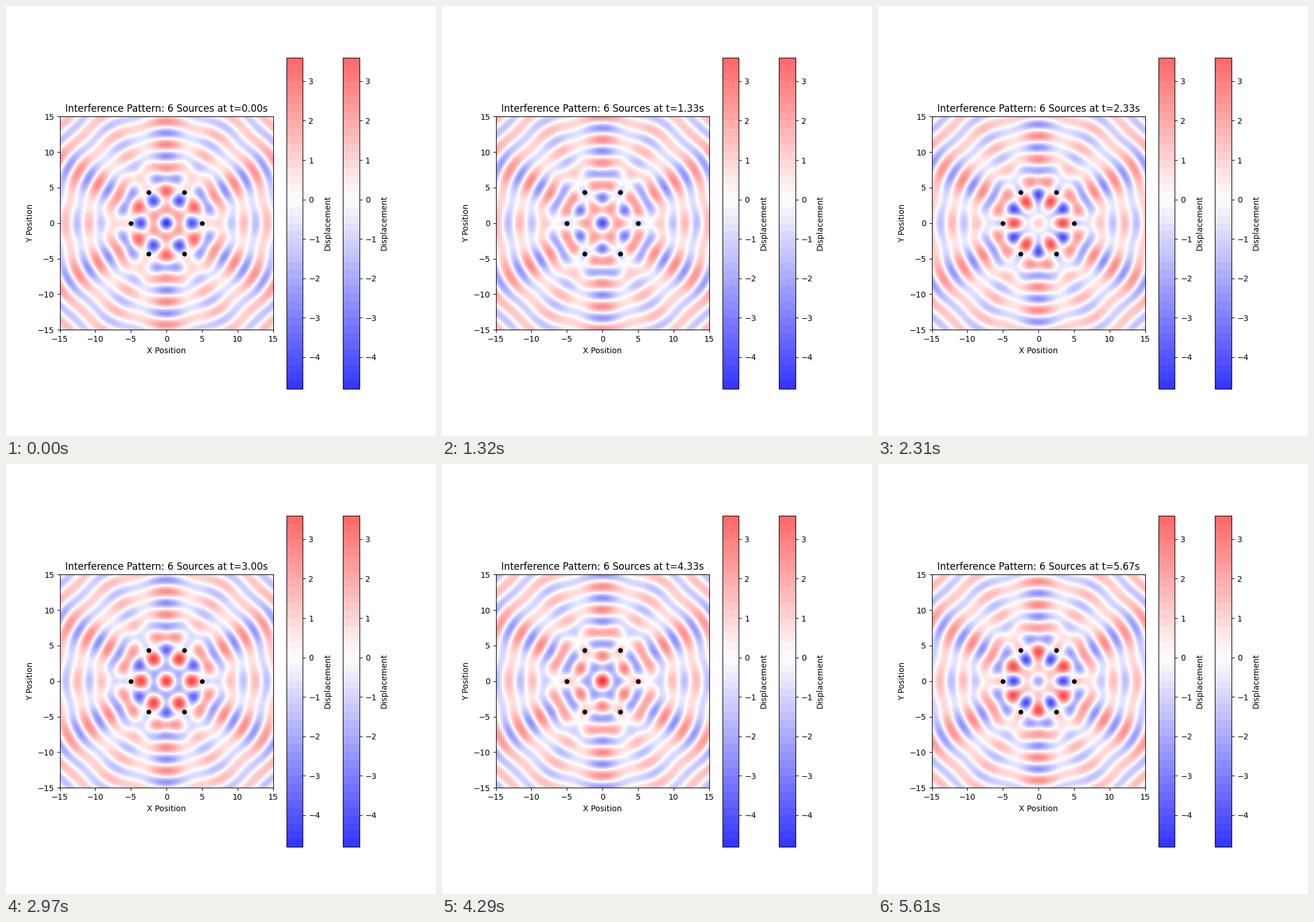
A matplotlib script for the animation above (5940 ms loop, 748x748 px).

```python
import numpy as np
import matplotlib.pyplot as plt
from matplotlib.animation import FuncAnimation

FRAMES, INTERVAL, DURATION = 18, 330, 6.0
N_SOURCES, RADIUS, EXTENT = 6, 5.0, 15
WAVENUMBER, OMEGA = 2.0, 1.0

angles = 2 * np.pi * np.arange(N_SOURCES) / N_SOURCES
source_x, source_y = RADIUS * np.cos(angles), RADIUS * np.sin(angles)

axis = np.linspace(-EXTENT, EXTENT, 100)
X, Y = np.meshgrid(axis, axis)
distances = [np.hypot(X - sx, Y - sy) for sx, sy in zip(source_x, source_y)]


def displacement(t):
    return sum(np.cos(WAVENUMBER * r - OMEGA * t) for r in distances)


fig, ax = plt.subplots(figsize=(7.48, 7.48), dpi=100)


def draw_field(t):
    return ax.contourf(X, Y, displacement(t), levels=50, cmap="bwr",
                       vmin=-N_SOURCES, vmax=N_SOURCES)


field = draw_field(0)
for _ in range(2):
    fig.colorbar(field, ax=ax, label="Displacement")

ax.plot(source_x, source_y, "ko", markersize=5)
ax.set(xlim=(-EXTENT, EXTENT), ylim=(-EXTENT, EXTENT), aspect="equal",
       xlabel="X Position", ylabel="Y Position")
ticks = np.arange(-EXTENT, EXTENT + 1, 5)
ax.set_xticks(ticks)
ax.set_yticks(ticks)


def update(frame):
    global field
    t = frame * DURATION / FRAMES
    field.remove()
    field = draw_field(t)
    ax.set_title(f"Interference Pattern: {N_SOURCES} Sources at t={t:.2f}s")
    return []


anim = FuncAnimation(fig, update, frames=FRAMES, interval=INTERVAL,
                     init_func=lambda: update(0), repeat=True, repeat_delay=0)
plt.show()
```
